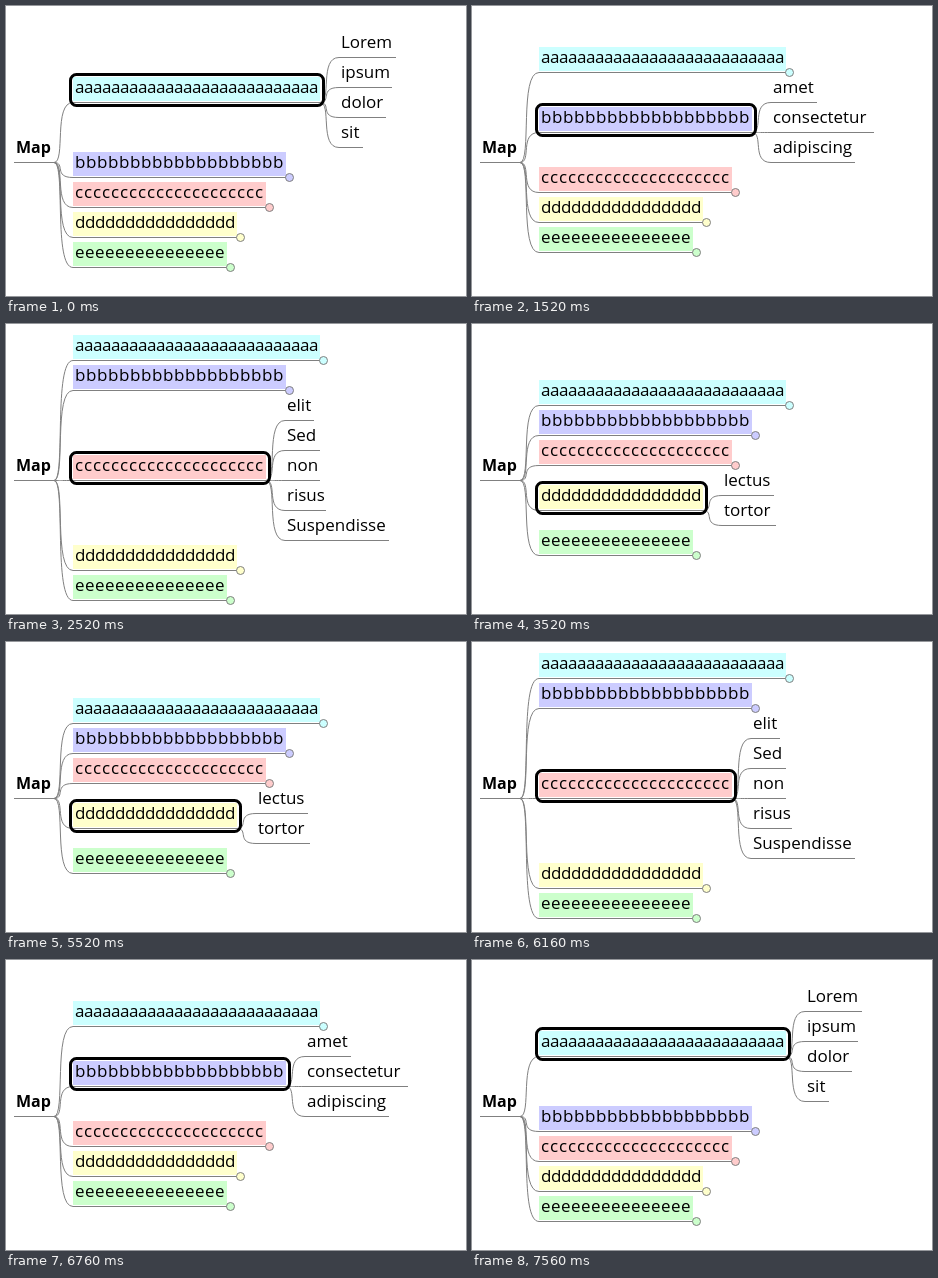
Animation, 460 px wide and 290 px high, one loop 8.36 s. Source, as an HTML page:

```html
<!DOCTYPE html>
<html lang="en">
<head>
<meta charset="utf-8">
<title>Mind map folding</title>
<style>
  html, body { margin: 0; width: 100%; height: 100%; overflow: hidden; background: #fff; }
  svg { display: block; }
  text { font: 17px "Open Sans", "Noto Sans", sans-serif; }
  .root { font-size: 16px; font-weight: bold; }
  path { fill: none; stroke: #808080; }
  circle { stroke: #808080; }
  .selection { fill: none; stroke: #000; stroke-width: 3; }
</style>
</head>
<body>
<svg id="stage" width="460" height="290"></svg>
<script>
const LOOP = 8360, PITCH = 30, CENTER = 156;
const ROOT_X = 8, ROOT_END = 48, GAP = 19;

// Letters sit on a whole-pixel advance; each leaf is [word, underline length].
const branches = [
  { letter: "a", count: 27, advance: 9, color: "#ccffff",
    leaves: [["Lorem", 57], ["ipsum", 53], ["dolor", 47], ["sit", 24]] },
  { letter: "b", count: 19, advance: 11, color: "#ccccff",
    leaves: [["amet", 46], ["consectetur", 103], ["adipiscing", 84]] },
  { letter: "c", count: 21, advance: 9, color: "#ffcccc",
    leaves: [["elit", 29], ["Sed", 35], ["non", 35], ["risus", 41], ["Suspendisse", 104]] },
  { letter: "d", count: 16, advance: 10, color: "#ffffcc",
    leaves: [["lectus", 52], ["tortor", 54]] },
  { letter: "e", count: 15, advance: 10, color: "#ccffcc",
    leaves: [["dignissim", 78], ["sit", 24], ["amet", 46], ["adipiscing", 84]] },
];

// [start time in ms, index of the unfolded branch]
const schedule = [[0, 0], [1520, 1], [2520, 2], [3520, 3], [4320, 4],
                  [5520, 3], [6160, 2], [6760, 1], [7560, 0]];

const stage = document.getElementById("stage");

const underline = (x1, x2, y) => `<path d="M${x1} ${y + .5}H${x2}"/>`;
const label = (x, y, text, cls = "") => `<text class="${cls}" x="${x}" y="${y - 9}">${text}</text>`;
const edge = (x, y1, y2) =>
  `<path d="M${x} ${y1 + .5}C${x + 12} ${y1 + .5} ${x + GAP - 20} ${y2 + .5} ${x + GAP} ${y2 + .5}"/>`;

function drawBranch(branch, y) {
  const x = ROOT_END + GAP;
  const letterXs = Array.from({ length: branch.count }, (_, i) => x + 2 + i * branch.advance);
  const width = branch.count * branch.advance + 4;
  return edge(ROOT_END, CENTER, y)
    + `<rect x="${x}" y="${y - 25}" width="${width}" height="24" fill="${branch.color}"/>`
    + underline(x, x + width, y)
    + label(letterXs.join(" "), y, branch.letter.repeat(branch.count));
}

function drawLeaves(branch, y, top) {
  const left = ROOT_END + GAP;
  const width = branch.count * branch.advance + 4;
  const right = left + width;
  const leaves = branch.leaves.map(([word, length], i) => {
    const x = right + GAP, leafY = top + i * PITCH;
    return edge(right, y, leafY) + underline(x, x + length, leafY) + label(x + 2, leafY, word);
  });
  return leaves.join("")
    + `<rect class="selection" x="${left - 2.5}" y="${y - 27.5}" width="${width + 6}" height="31" rx="6"/>`;
}

function drawFold(branch, y) {
  const x = ROOT_END + GAP + branch.count * branch.advance + 7.5;
  return `<circle cx="${x}" cy="${y + .5}" r="4" fill="${branch.color}"/>`;
}

function drawMap(open) {
  const slots = branches.length - 1 + branches[open].leaves.length;
  let top = CENTER - (slots - 1) * PITCH / 2;
  let svg = underline(ROOT_X, ROOT_END, CENTER) + label(ROOT_X + 2, CENTER, "Map", "root");
  branches.forEach((branch, i) => {
    const span = i === open ? branch.leaves.length : 1;
    const y = top + (span - 1) * PITCH / 2;
    svg += drawBranch(branch, y) + (i === open ? drawLeaves(branch, y, top) : drawFold(branch, y));
    top += span * PITCH;
  });
  stage.innerHTML = svg;
}

let shown = -1;
const start = performance.now();

function tick() {
  const time = (performance.now() - start) % LOOP;
  const open = schedule.findLast(([from]) => from <= time)[1];
  if (open !== shown) drawMap(shown = open);
  requestAnimationFrame(tick);
}
tick();
</script>
</body>
</html>
```
